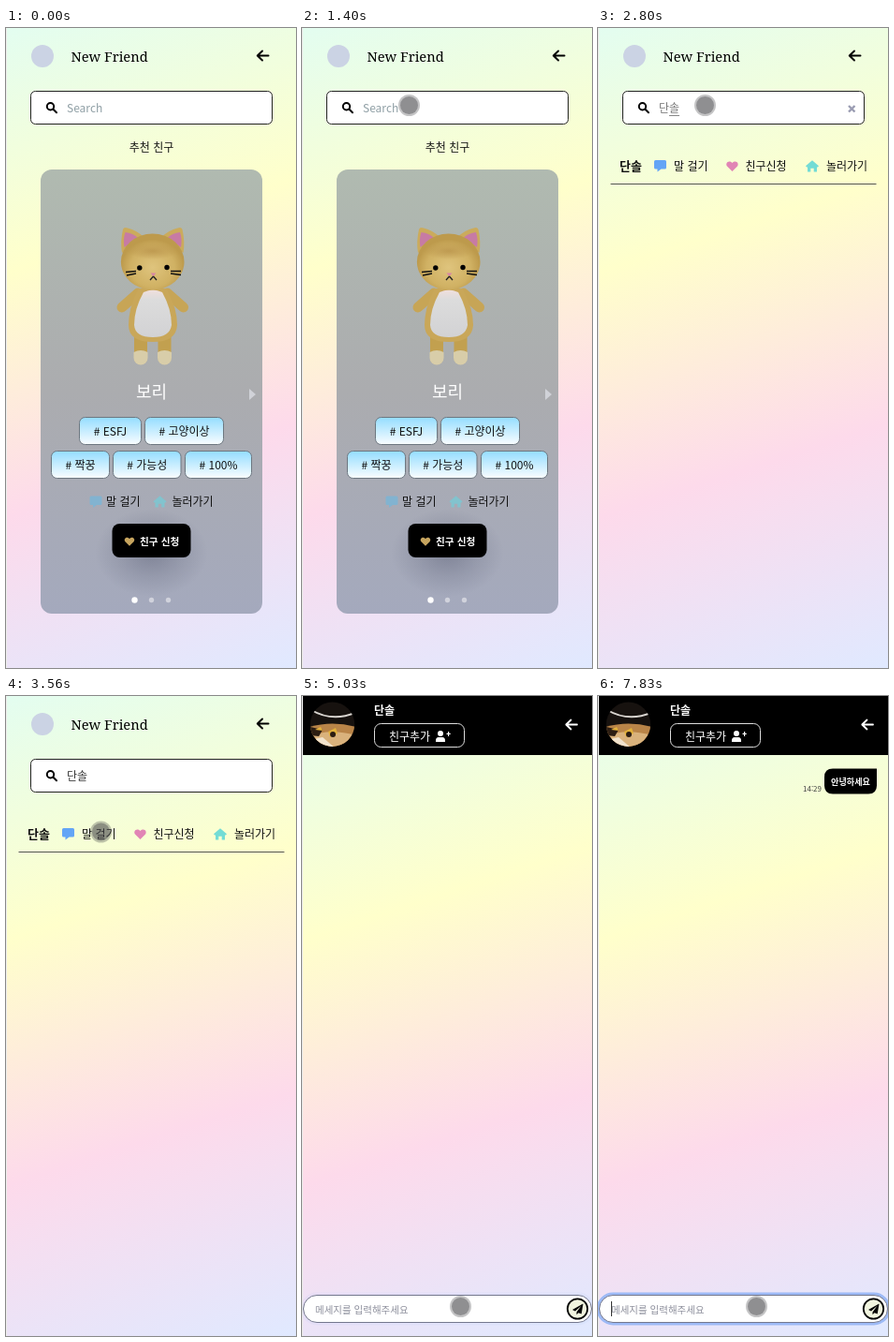
Animation, 310 px wide and 683 px high, one loop 8000 ms. Source, as an HTML page:

```html
<!DOCTYPE html>
<html lang="ko">
<head>
<meta charset="utf-8">
<title>New Friend</title>
<style>
  html, body { margin: 0; width: 100%; height: 100%; overflow: hidden; background: #fff; }
  svg { display: block; }
  text { font: 12px "Noto Sans CJK KR", "Noto Sans KR", "Noto Sans CJK", sans-serif; fill: #111; white-space: pre; }
  .m { text-anchor: middle; }
  .md { font-weight: 500; }
  .b { font-weight: 700; }
  .w { fill: #fff; }
  .hint { fill: #8f9fa5; }
  .title { font: 500 14.7px "Noto Serif", serif; fill: #000; }
  .tag rect { fill: url(#tagFill); stroke: #6d7780; }
  .line { fill: none; stroke: #000; stroke-width: 2; stroke-linecap: round; stroke-linejoin: round; }
</style>
</head>
<body>
<svg width="310" height="683" viewBox="0 0 310 683">
  <defs>
    <linearGradient id="cardFill" x2="0" y2="1">
      <stop stop-color="#b0bab0"/><stop offset=".5" stop-color="#abacaf"/><stop offset="1" stop-color="#a4a9bd"/>
    </linearGradient>
    <linearGradient id="tagFill" x2="0" y2="1">
      <stop stop-color="#94ddff"/><stop offset="1" stop-color="#fafdff"/>
    </linearGradient>
    <radialGradient id="shade">
      <stop stop-color="#4b5068" stop-opacity=".42"/><stop offset=".55" stop-color="#4b5068" stop-opacity=".17"/><stop offset="1" stop-color="#4b5068" stop-opacity="0"/>
    </radialGradient>
    <radialGradient id="fur" cy=".6">
      <stop stop-color="#dfc47d"/><stop offset=".7" stop-color="#d0b163"/><stop offset="1" stop-color="#bd9a4c"/>
    </radialGradient>
    <radialGradient id="brow">
      <stop stop-color="#b8924a" stop-opacity=".75"/><stop offset="1" stop-color="#b8924a" stop-opacity="0"/>
    </radialGradient>
    <linearGradient id="belly" x2="0" y2="1">
      <stop stop-color="#f0dfdc"/><stop offset=".2" stop-color="#dcdcdc"/><stop offset="1" stop-color="#d2d2d4"/>
    </linearGradient>
    <linearGradient id="sky" gradientUnits="userSpaceOnUse">
      <stop stop-color="#e3fdf0"/><stop offset=".333" stop-color="#ffffcb"/><stop offset=".667" stop-color="#fddaeb"/><stop offset="1" stop-color="#e0e9ff"/>
    </linearGradient>
    <clipPath id="round"><circle cx="32.5" cy="30.2" r="23.7"/></clipPath>
    <path id="heart" d="M0 5.5L-5.3 .2C-8-3-4-7.5 0-3.6C4-7.5 8-3 5.3 .2Z"/>
    <path id="talk" d="M-5-6H5Q6.5-6 6.5-4.500V2Q6.5 3.500 5 3.500H1L-3 6.500V3.500H-5Q-6.500 3.500-6.500 2V-4.500Q-6.500-6-5-6Z"/>
    <path id="home" d="M0-6.300L7-.2L6 .9H5V6H1.700V2.200H-1.700V6H-5V.9H-6L-7-.2Z"/>
    <path id="back" d="M6 0H-5.500M-.5-5L-5.700 0L-.5 5"/>
  </defs>

  <rect width="310" height="683" fill="#eeeeec"/>
  <rect x="1" width="309" height="683" fill="url(#sky)"/>

  <g id="finder">
    <circle cx="39" cy="30" r="12" fill="#cbd3e4"/>
    <text class="title" x="69.500" y="36">New Friend</text>
    <use href="#back" x="274.500" y="29.500" class="line"/>
    <rect x="26.500" y="67.500" width="258" height="35" rx="5" fill="#fff" stroke="#222"/>
    <circle cx="47.500" cy="83.800" r="3.700" class="line"/>
    <path d="M50.500 86.800L54 90.300" class="line"/>
    <text class="hint" id="findHint" x="65" y="90">Search</text>
    <text id="findText" x="65" y="90"></text>
    <path id="findLine" stroke="#888"/>
    <path id="findCaret" stroke="#333"/>
    <path id="clear" d="M268 83L274.500 89.500M274.500 83L268 89.500" stroke="#9a9cb2" stroke-width="2.400"/>

    <g id="pick">
      <text class="m md" x="155.500" y="132">추천 친구</text>
      <rect x="37" y="151" width="237" height="474" rx="12" fill="url(#cardFill)"/>
      <g id="cat">
        <g id="side">
          <path d="M141 283L124 298" stroke="#c7a556" stroke-width="11" stroke-linecap="round"/>
          <path d="M137 325h14v27a7 7 0 0 1-14 0z" fill="#c2a04f"/>
          <path d="M136.500 346q7.500-4 15 0v6a7.500 7.500 0 0 1-15 0z" fill="#d8cda9"/>
          <path d="M125 215Q126 212 130 213.500Q140 216 147 223L124 240Q122 228 125 215Z" fill="#cbab5c"/>
          <path d="M127.500 218Q136 219 141 224L126.500 234Q125 225 127.500 218Z" fill="#c77ba4"/>
        </g>
        <use href="#side" transform="matrix(-1 0 0 1 313.500 0)"/>
        <path d="M141 279Q157 272 172 279Q183 299 183 317Q182 335 157 335Q131 335 131 317Q131 299 141 279Z" fill="#c9a759"/>
        <path d="M147 282Q157 277 167 282Q177 300 177 317Q175 330 157 330Q138 330 137 317Q137 300 147 282Z" fill="url(#belly)"/>
        <ellipse cx="156.700" cy="249.500" rx="33.800" ry="30" fill="url(#fur)"/>
        <ellipse cx="156.700" cy="238" rx="27" ry="9" fill="url(#brow)"/>
        <circle cx="142.800" cy="256" r="2.700"/>
        <circle cx="172" cy="255.500" r="2.700"/>
        <path d="M128 260.500L139 259.500M129 264L139 262M176 259.500H187M176 262L187 263.500" stroke="#111" stroke-width="1.300"/>
        <path d="M154.500 261.500h6l-3 3.500z" fill="#d986a5"/>
        <path d="M157.500 265L154 269M157.500 265L161 269" stroke="#222" stroke-width="1.300"/>
      </g>
      <text class="m md w" x="155.500" y="395" style="font-size:18px">보리</text>
      <path d="M260 385L267 391L260 397Z" fill="#d0d2d8"/>
      <g id="tags"></g>
      <use href="#talk" x="96" y="505.500" fill="#82b3d0"/>
      <text x="107" y="509.500">말 걸기</text>
      <use href="#home" x="164.500" y="505.500" fill="#82c3ce"/>
      <text x="177.500" y="509.500">놀러가기</text>
      <ellipse cx="155.500" cy="560" rx="60" ry="47" fill="url(#shade)"/>
      <rect x="113.500" y="529" width="84" height="36" rx="8"/>
      <use href="#heart" transform="translate(132 548) scale(.85)" fill="#c6a45e"/>
      <text class="b w" x="143" y="552" style="font-size:10.700px">친구 신청</text>
      <circle cx="137.500" cy="610.500" r="3.200" fill="#fff"/>
      <g fill="#d0d2dc"><circle cx="155.500" cy="610.500" r="2.700"/><circle cx="173.500" cy="610.500" r="2.700"/></g>
    </g>

    <g id="found">
      <text class="b" x="23" y="152.300" style="font-size:13px">단솔</text>
      <use href="#talk" x="66.500" y="147" fill="#63a5f6"/>
      <text x="81" y="152">말 걸기</text>
      <use href="#heart" x="143.500" y="147.500" fill="#e184b5"/>
      <text x="157.500" y="152">친구신청</text>
      <use href="#home" x="229" y="147.500" fill="#73dcd5"/>
      <text x="244" y="152">놀러가기</text>
      <path d="M13.500 166.500H297.500" stroke="#555"/>
    </g>
  </g>

  <g id="chat">
    <rect id="bar" x="1" width="309" height="62"/>
    <g id="face" clip-path="url(#round)">
      <rect x="8" y="6" width="50" height="50" fill="#17120f"/>
      <path d="M10 15Q32 28 57 18" fill="none" stroke="#d9d5d0" stroke-width="2"/>
      <path d="M8 33Q32 26 58 33V56H8Z" fill="#b98448"/>
      <path d="M8 43Q30 34 57 42V56H8Z" fill="#d9b27c"/>
      <path d="M9 33L22 36L18 43L9 42Z" fill="#2c1d12"/>
      <path d="M28 38l8-4 2 6-8 4zM14 36l6-3 2 4z" fill="#e2b13c"/>
      <circle cx="33" cy="41" r="3" fill="#2c1d12"/>
      <path d="M8 47L22 44L36 56H8Z" fill="#f1e3cd"/>
    </g>
    <text class="b w" x="77" y="20">단솔</text>
    <rect x="77.500" y="29.500" width="96" height="25" rx="7" stroke="#ddd"/>
    <text class="md w" x="93" y="47.500">친구추가</text>
    <g fill="#fff"><circle cx="148" cy="40" r="3"/><path d="M143 49V47.500Q143 44 146 44H150Q153 44 153 47.500V49ZM154.500 39.800h1.500v-1.800h1.200v1.800h1.500v1.300h-1.500v1.800h-1.200v-1.800h-1.500z"/></g>
    <use href="#back" x="288" y="30.500" class="line" style="stroke:#fff;stroke-width:1.800"/>
    <g id="sent">
      <path d="M251 77.500H298V95.500Q298 104.500 289 104.500H251Q242 104.500 242 95.500V86.500Q242 77.500 251 77.500Z"/>
      <text class="m b w" x="270" y="94.500" style="font-size:9.100px">안녕하세요</text>
      <text x="219" y="101.700" style="font-size:8px;fill:#444">14:29</text>
    </g>
    <rect id="glow" x="1" y="639" width="309" height="30" rx="15" fill="none" stroke="#9dbaf6" stroke-width="5"/>
    <rect x="1.500" y="639.500" width="308" height="29" rx="14.500" fill="#fff" stroke="#74788e"/>
    <text id="chatHint" x="14" y="658.800" style="font-size:10.500px;fill:#8d8f9c">메세지를 입력해주세요</text>
    <text id="chatText" x="14" y="658.800" style="font-size:10.500px"></text>
    <path id="chatLine" stroke="#777"/>
    <path id="chatCaret" stroke="#333"/>
    <circle cx="294.500" cy="654" r="10.700" fill="#f1f5df" stroke="#000" stroke-width="1.800"/>
    <path d="M300.500 648.500L289 655L292 656.600L298.500 650.700L293.500 657.500V660.300L295.500 658.200L298.700 659.600Z"/>
  </g>

  <g id="dot" fill="#46464b">
    <circle r="11.500" opacity=".32"/>
    <circle r="9.500" opacity=".42"/>
  </g>
</svg>
<script>
const LOOP = 8000, BLINK = 530;
const $ = id => document.getElementById(id);
const show = (id, on) => { $(id).style.display = on ? '' : 'none'; };

// gradient line for a 162 degree tilt, corner to corner
const a = 162 * Math.PI / 180, sx = Math.sin(a), sy = -Math.cos(a);
const half = (310 * sx + 683 * sy) / 2;
const ends = { x1: 155 - sx * half, y1: 341.5 - sy * half, x2: 155 + sx * half, y2: 341.5 + sy * half };
for (const k in ends) $('sky').setAttribute(k, ends[k]);

$('tags').innerHTML = [
  [78.5, 415.5, 66, '# ESFJ'], [148.5, 415.5, 84, '# 고양이상'],
  [48.5, 451.5, 62, '# 짝꿍'], [114.5, 451.5, 72.5, '# 가능성'], [191.5, 451.5, 71, '# 100%']
].map(([x, y, w, s]) => `<g class="tag"><rect x="${x}" y="${y}" width="${w}" height="29" rx="6"/>` +
  `<text class="m md" x="${x + w / 2}" y="${y + 19}">${s}</text></g>`).join('');

// pointer path: time, x, y
const path = [
  [0, 180, -14], [140, 245, 90], [290, 268, 300], [430, 225, 444], [600, 165, 270], [760, 122, 110], [870, 114.5, 82.5],
  [2860, 114.5, 82.5], [3030, 112, 95], [3240, 104, 132], [3430, 101.5, 145],
  [4030, 101.5, 145], [4100, 127, 245], [4165, 168, 415], [4230, 199.5, 539.5], [4310, 201, 592], [4400, 186, 623], [4490, 170.5, 631.5],
  [4600, 170.5, 631.5], [4760, 170.5, 644], [4890, 169.5, 651.5]
];

// typing: time, text, still composing
const findKeys = [
  [870, ''], [1800, '다', 1], [1870, '단', 1], [1970, '단ㅅ', 1], [2070, '단소', 1], [2170, '단솔', 1], [2270, '단솔', 1], [3500, '단솔']
];
const chatKeys = [
  [5160, ''], [6020, 'ㅇ', 1], [6090, '아', 1], [6230, '안', 1], [6370, '안ㄴ', 1], [6460, '안녀', 1], [6560, '안녕', 1],
  [6760, '안녕ㅎ', 1], [6850, '안녕하', 1], [6940, '안녕핫', 1], [7030, '안녕하세', 1],
  [7230, '안녕하셍', 1], [7360, '안녕하세요', 1], [7560, '안녕하세요'], [7830, '']
];

function pointer(t) {
  const i = path.findIndex(p => p[0] > t);
  if (i < 0) return path[path.length - 1].slice(1);
  const [t0, x0, y0] = path[i - 1], [t1, x1, y1] = path[i], k = (t - t0) / (t1 - t0);
  return [x0 + (x1 - x0) * k, y0 + (y1 - y0) * k];
}

function typing(name, keys, t, x, size, top, bottom, caretEnd = LOOP) {
  const [at, text, composing] = keys.filter(k => k[0] <= t).pop() || [Infinity, ''];
  const adv = size * .92, end = x + text.length * adv;
  $(name + 'Text').textContent = text;
  $(name + 'Text').style.fill = composing ? '#777' : '#333';
  $(name + 'Line').setAttribute('d', `M${end - adv} ${bottom - .5}H${end}`);
  $(name + 'Caret').setAttribute('d', `M${Math.floor(end) + .5} ${top}V${bottom}`);
  show(name + 'Hint', !text);
  show(name + 'Line', composing);
  show(name + 'Caret', t >= at && t < caretEnd && Math.floor((t - at) / BLINK) % 2 === 0);
}

function draw(t) {
  const [x, y] = pointer(t), chatting = t >= 3630;
  $('dot').setAttribute('transform', `translate(${x} ${y})`);
  show('finder', !chatting);
  show('chat', chatting);
  if (chatting) {
    show('face', t >= 3700);
    show('sent', t >= 7830);
    $('bar').setAttribute('height', t < 5030 ? 62 : 63);
    $('glow').setAttribute('opacity', Math.max(0, Math.min(1, (t - 5000) / 290)));
    typing('chat', chatKeys, t, 14, 10.5, 646, 662);
  } else {
    show('pick', t < 1800);
    show('found', t >= 2270);
    show('clear', t >= 1800 && y < 103);
    typing('find', findKeys, t, 65, 12, 76, 94, 3500);
  }
}

const start = performance.now();
function tick() {
  draw((performance.now() - start) % LOOP);
  requestAnimationFrame(tick);
}
tick();
</script>
</body>
</html>
```
